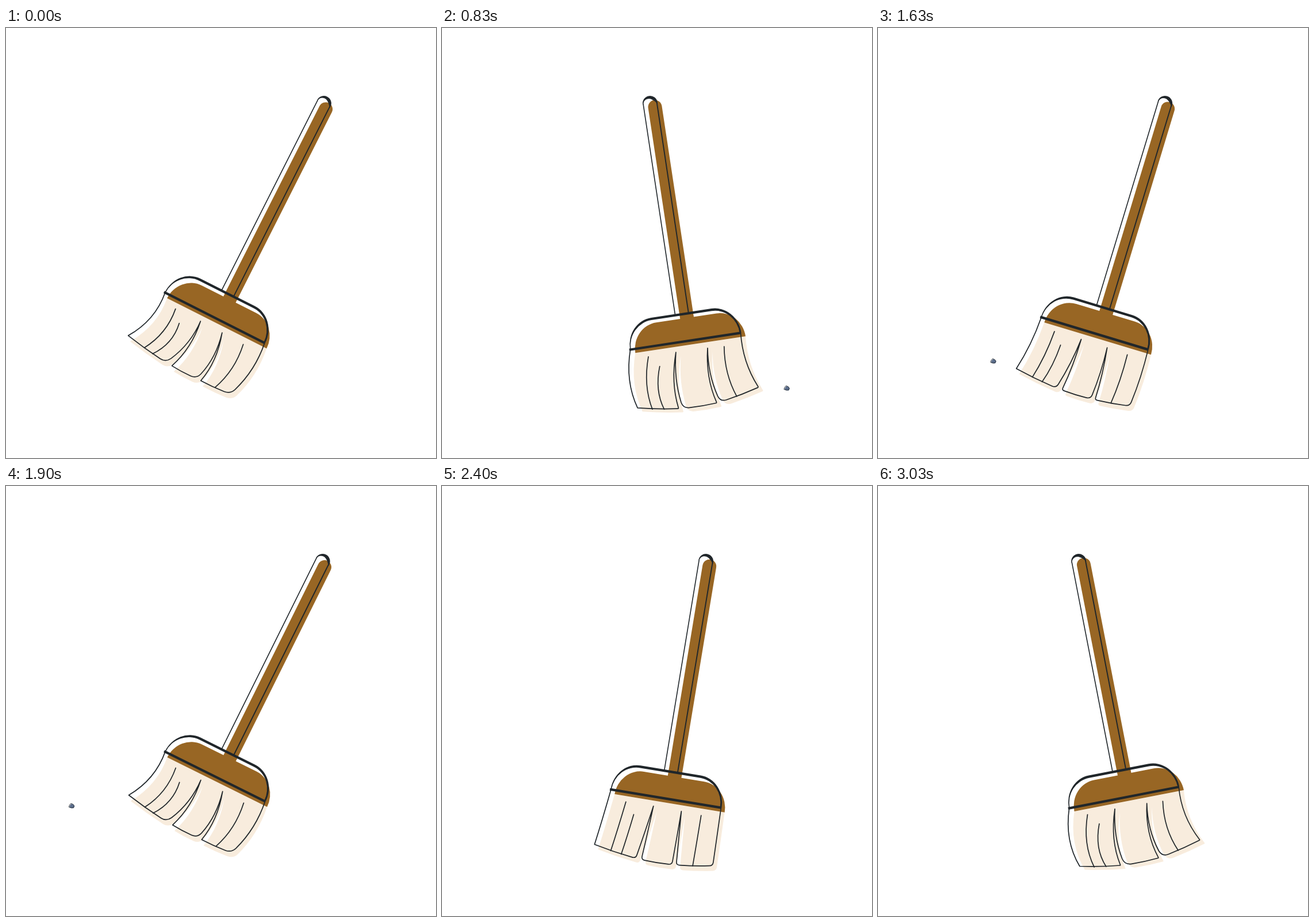
An HTML page with a canvas that plays this animation: 748 by 748 pixels, repeating every 3.06 s.

```html
<!DOCTYPE html>
<html lang="en">
<head>
<meta charset="utf-8">
<title>Sweeping broom</title>
<style>
  html, body { margin: 0; width: 100%; height: 100%; overflow: hidden; background: #fff; }
  canvas { display: block; width: 748px; height: 748px; }
</style>
</head>
<body>
<canvas id="stage" width="748" height="748"></canvas>
<script>
const ctx = document.getElementById('stage').getContext('2d');
const INK = '#20262a', BROWN = '#986624', CREAM = '#f8ecdd';
const LOOP = 3060;
const LEFT = 26.8, RIGHT = -11;          // tilt in degrees at the ends of a sweep
const strokes = [
  { at: 0, dur: 980, pow: 1 },
  { at: 980, dur: 980, pow: 1 },
  { at: 1960, dur: 1060, pow: 0.85 }     // sets off faster
];

const clamp = x => Math.max(0, Math.min(1, x));
const mix = (a, b, k) => a + (b - a) * k;
const mixPt = (p, q, k) => [mix(p[0], q[0], k), mix(p[1], q[1], k)];
const smooth = x => x * x * (3 - 2 * x);

function tiltAt(t) {
  const i = strokes.findLastIndex(s => t >= s.at), s = strokes[i];
  const k = smooth(clamp((t - s.at) / s.dur) ** s.pow);
  return i % 2 ? mix(RIGHT, LEFT, k) : mix(LEFT, RIGHT, k);
}

// Bristle curl, 1 at the left end to -1 at the right
function curlAt(tilt) {
  const n = (tilt - (LEFT + RIGHT) / 2) / ((LEFT - RIGHT) / 2);
  return n > 0 ? n ** 1.6 : n;
}

// A bristle as a quadratic curve: the tip swings one way, the belly the other
function bristle(b, x, y, tipX, sway) {
  const tipY = 531 - 0.0011 * tipX ** 2 + b * (0.0008 * Math.max(0, tipX) ** 2 - 3.5);
  const belly = b * (9.5 - 0.03 * tipX);
  return [[x, y], [(x + tipX) / 2 + belly, (y + tipY) / 2 + 3], [tipX - sway * b, tipY]];
}

// Left and right edges of the three tufts
function tufts(b) {
  const slit = 29 - 7 * b;
  return [
    [bristle(b, -98, 418, -110.5, 11), bristle(b, -20.5, 435, -36, 6.5)],
    [bristle(b, -20.5, 435, -26, 4), bristle(b, slit, 436, 28, 10)],
    [bristle(b, slit, 436, 35.5, 9), bristle(b, 96, 418, 98.5, 16)]
  ];
}

const strands = b => [
  bristle(b, -69, 435.5, -81, 6),
  bristle(b, -52, 455, -62, 7.5),
  bristle(b, 64, 437.5, 64, 10)
];

// Blossom of a quadratic curve; equal parameters give a point on it
function blossom(q, s, u) {
  return mixPt(mixPt(q[0], q[1], s), mixPt(q[1], q[2], s), u);
}

// Draws a curve cut short by r0 and r1, rounding the corner before it
function addCurve(q, r0, r1) {
  const len = Math.hypot(q[2][0] - q[0][0], q[2][1] - q[0][1]);
  const s = r0 / len, e = 1 - r1 / len;
  if (s) ctx.quadraticCurveTo(...q[0], ...blossom(q, s, s));
  ctx.quadraticCurveTo(...blossom(q, s, e), ...blossom(q, e, e));
}

function traceBristles(b) {
  ctx.beginPath();
  tufts(b).forEach(([left, right], i) => {
    const [p, q] = [left[2], right[2]];
    const rl = i ? Math.max(0, 6 - 6 * b) : 0, rr = 6 + 5 * b;
    const [mx, my] = mixPt(p, q, 0.5);
    ctx.lineTo(...left[0]);
    addCurve(left, 0, rl);
    addCurve([p, [mx, my + 2], q], rl, rr);
    addCurve([...right].reverse(), rr, 0);
  });
}

function fillShapes(b) {
  ctx.save();
  ctx.translate(7.5, 7.6);
  ctx.fillStyle = CREAM;
  traceBristles(b);
  ctx.fill();

  ctx.fillStyle = BROWN;
  ctx.beginPath();
  ctx.arc(0, 0, 12, Math.PI, 0);
  ctx.lineTo(12, 385);
  ctx.lineTo(-12, 385);
  ctx.fill();

  ctx.beginPath();
  ctx.ellipse(-54, 418, 44, 47, 0, Math.PI, Math.PI * 1.5);
  ctx.ellipse(52, 418, 44, 47, 0, -Math.PI / 2, 0);
  ctx.fill();
  ctx.restore();
}

function line(width, ...pts) {
  ctx.lineWidth = width;
  ctx.beginPath();
  pts.forEach(p => ctx.lineTo(...p));
  ctx.stroke();
}

function inkLines(b) {
  ctx.strokeStyle = ctx.fillStyle = INK;
  ctx.lineCap = ctx.lineJoin = 'round';

  ctx.lineWidth = 1.7;
  traceBristles(b);
  ctx.stroke();
  for (const [p, c, q] of strands(b)) {
    ctx.beginPath();
    ctx.moveTo(...p);
    ctx.quadraticCurveTo(...c, ...q);
    ctx.stroke();
  }

  line(1.6, [-12, 0], [-12, 370]);
  line(1.9, [11.8, 0], [11.5, 370]);

  // Handle tip, thicker towards the right
  ctx.beginPath();
  ctx.arc(0, 0, 13, Math.PI, 0);
  ctx.lineTo(12.8, 3);
  ctx.bezierCurveTo(8.5, -3.5, 4, -7, 0, -8.2);
  ctx.bezierCurveTo(-6, -9.2, -11, -6, -11.5, 0);
  ctx.fill();

  // Head contour, thin at the left foot
  ctx.beginPath();
  ctx.ellipse(-54, 418, 44.7, 49, 0, Math.PI, Math.PI * 1.5);
  ctx.ellipse(52, 418, 45, 49, 0, -Math.PI / 2, 0);
  ctx.ellipse(52, 418, 42.2, 44.8, 0, 0, -Math.PI / 2, true);
  ctx.ellipse(-54, 418, 43.2, 44.8, 0, -Math.PI / 2, -Math.PI, true);
  ctx.fill();

  ctx.lineCap = 'butt';
  line(4.2, [-100, 418.5], [96, 418.5]);
}

// Each sweep throws a speck ahead of the broom from its middle on
function drawSpeck(stroke, i, t) {
  const p = (t - stroke.at - 490 - (i === 2 ? 40 : 0)) / 500;
  const size = clamp(p / 0.2) * clamp((1.06 - p) / 0.2);
  if (size <= 0) return;
  const [from, to] = i % 2 ? [[306, 608], [111, 556]] : [[542, 646], [607, 625]];
  const [x, y] = mixPt(from, to, 1 - (1 - clamp(p)) ** 2);
  const blob = () => {
    ctx.beginPath();
    for (let j = 0; j < 7; j++) {
      const a = j * Math.PI * 2 / 7, r = 4.6 + 0.7 * Math.sin(j * 2.7);
      ctx.lineTo(Math.cos(a) * r, Math.sin(a) * r * 0.85);
    }
    ctx.closePath();
  };
  ctx.save();
  ctx.translate(x, y);
  ctx.scale(size, size);
  ctx.fillStyle = '#5c6e8c';
  blob();
  ctx.fill();
  ctx.translate(-0.8, -0.6);
  ctx.strokeStyle = INK;
  ctx.lineWidth = 0.8;
  blob();
  ctx.stroke();
  ctx.restore();
}

function draw(t) {
  ctx.fillStyle = '#fff';
  ctx.fillRect(0, 0, 748, 748);
  strokes.forEach((s, i) => drawSpeck(s, i, t));

  const tilt = tiltAt(t), curl = curlAt(tilt);
  ctx.save();
  ctx.translate(408.4 + 5.39 * tilt, 131);
  ctx.rotate(tilt * Math.PI / 180);
  fillShapes(curl);
  inkLines(curl);
  ctx.restore();
}

// The picture holds for 30 ms and 70 ms in turn
const hold = t => Math.floor(t / 100) * 100 + (t % 100 < 30 ? 0 : 30);

const start = performance.now();
function tick() {
  draw(hold((performance.now() - start) % LOOP));
  requestAnimationFrame(tick);
}
tick();
</script>
</body>
</html>
```
